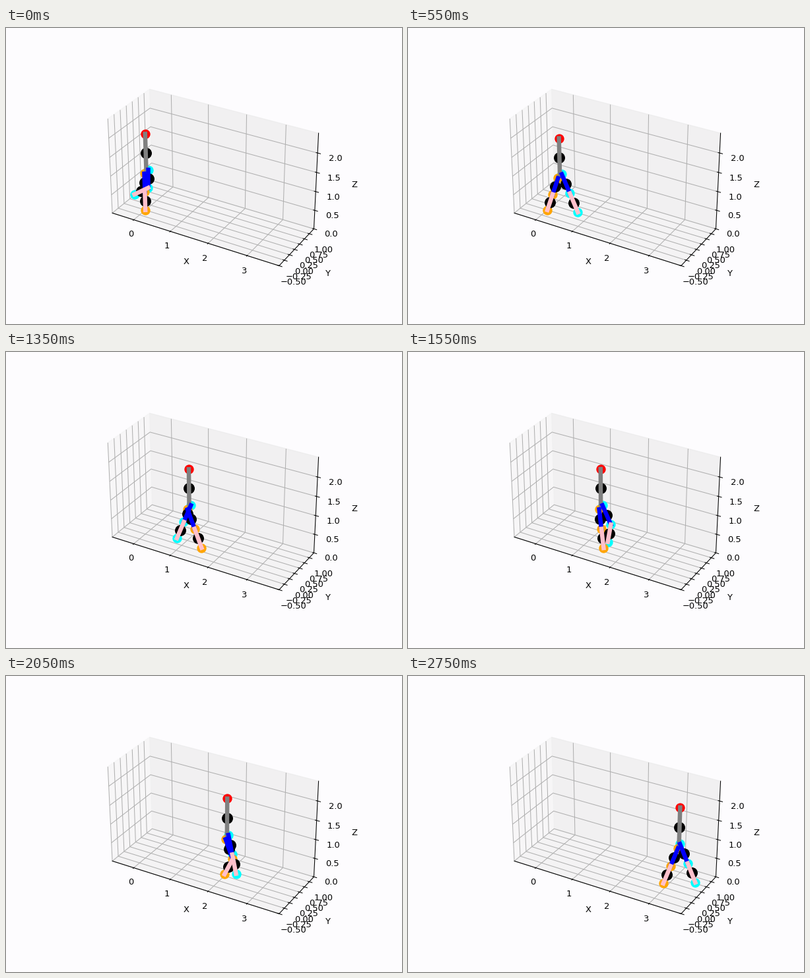
A matplotlib script for the animation above (2.8 s loop, 600 by 450 pixels).

```python
import numpy as np
import matplotlib.pyplot as plt
from matplotlib.animation import FuncAnimation

FRAMES, INTERVAL = 56, 50
LEG, HALF_LEG = 1.0, 0.5
HIP_HALF_WIDTH = 0.1
PAPER = "#fdfcfe"

# Alternating foothold sequence: right (orange) and left (cyan)
RIGHT, LEFT = 0, 1
HOLDS = np.array([
    [0.000, 0.000],
    [0.740, 0.213],
    [1.460, 0.130],
    [2.185, 0.464],
    [2.884, 0.390],
    [3.540, 0.740],
])
SWING_START = np.array([-0.43, 0.20])
START_LIFT = 0.2


def body_x(n):
    """Steadily speeding up, with a slower first push-off."""
    push_off = 0.037 * np.exp(-((n - 11) / 5)**2)
    return 0.0238 * n + 0.000605 * n**2 - push_off


def body_path(n):
    """Ground position and heading of the pelvis."""
    x = body_x(n)
    y = 0.09 + 0.09 * x + 0.025 * x**2
    return np.array([x, y]), np.arctan(0.09 + 0.05 * x)


# The legs swap roles when the body passes midway between two footholds
ticks = np.arange(FRAMES + 5)
midways = (HOLDS[1:, 0] + HOLDS[:-1, 0]) / 2
SWITCHES = np.append(0, np.interp(midways, body_x(ticks), ticks))


def knee_of(hip, foot):
    """Two equal links from hip to foot, bending forward."""
    span = foot - hip
    dist = np.linalg.norm(span)
    axis = span / dist
    forward = np.array([1.0, 0, 0])
    forward -= axis * (forward @ axis)
    forward /= np.linalg.norm(forward)
    bend = np.sqrt(max(HALF_LEG**2 - dist**2 / 4, 0))
    return (hip + foot) / 2 + bend * forward


def leg_height(hip_xy, foot_xy):
    return np.sqrt(LEG**2 - np.sum((hip_xy - foot_xy)**2))


def pose(n):
    """Return pelvis, head and both legs as (hip, knee, foot)."""
    ground, heading = body_path(n)
    side = HIP_HALF_WIDTH * np.array([-np.sin(heading), np.cos(heading)])
    hips = [ground - side, ground + side]

    step = np.searchsorted(SWITCHES, n, side="right") - 1
    s = (n - SWITCHES[step]) / (SWITCHES[step + 1] - SWITCHES[step])
    stance = RIGHT if step % 2 == 0 else LEFT
    swing = 1 - stance

    # The pelvis vaults over the straight stance leg
    height = leg_height(hips[stance], HOLDS[step])
    origin = SWING_START if step == 0 else HOLDS[step - 1]
    swing_xy = origin + (HOLDS[step + 1] - origin) * np.sin(np.pi * s / 2)
    if step == 0:
        lift = START_LIFT * (1 - s)**2
    else:
        lift = 0.2 * np.sin(np.pi * s) * (1 - s)**3
    lift = max(lift, height - leg_height(hips[swing], swing_xy), 0)

    feet = [None, None]
    feet[stance] = np.append(HOLDS[step], 0)
    feet[swing] = np.append(swing_xy, lift)
    legs = []
    for hip_xy, foot in zip(hips, feet):
        hip = np.append(hip_xy, height)
        legs.append((hip, knee_of(hip, foot), foot))
    pelvis = np.append(ground, height)
    return pelvis, pelvis + [0, 0, 1], legs


fig = plt.figure(figsize=(6.4, 4.8), dpi=93.75, facecolor=PAPER)
ax = fig.add_subplot(projection="3d", facecolor=PAPER)
ax.set_xticks(np.arange(4))
ax.set_yticks(np.arange(-0.5, 1.01, 0.25))
ax.set_zticks(np.arange(0, 2.1, 0.5))
ax.set(xlim=(-0.6, 3.8), ylim=(-0.5, 1.24), zlim=(0, 2.5),
       xlabel="X", ylabel="Y", zlabel="Z")
ax.set_box_aspect((4.4, 1.74, 2.5))


def dots(color, size):
    return ax.plot([], [], [], "o", color=color, markersize=size)[0]


def bar(color):
    return ax.plot([], [], [], color=color, linewidth=5)[0]


head_dot = dots("red", 10)
left_dots = dots("cyan", 10)
right_dots = dots("orange", 10)
mass_dots = dots("black", 12)
torso = bar("gray")
thighs = [bar("blue"), bar("blue")]
shins = [bar("pink"), bar("pink")]


def place(artist, *points):
    artist.set_data_3d(*np.array(points).T)


def update(n):
    pelvis, head, legs = pose(n)
    place(head_dot, head)
    place(right_dots, *legs[RIGHT])
    place(left_dots, *legs[LEFT])
    place(torso, pelvis, head)
    masses = [(pelvis + head) / 2]
    for (hip, knee, foot), thigh, shin in zip(legs, thighs, shins):
        place(thigh, hip, knee)
        place(shin, knee, foot)
        masses += [(hip + knee) / 2, (knee + foot) / 2]
    place(mass_dots, *masses)
    return [head_dot, left_dots, right_dots, mass_dots, torso, *thighs, *shins]


anim = FuncAnimation(fig, update, frames=FRAMES, interval=INTERVAL,
                     repeat=True, repeat_delay=0)
plt.show()
```
